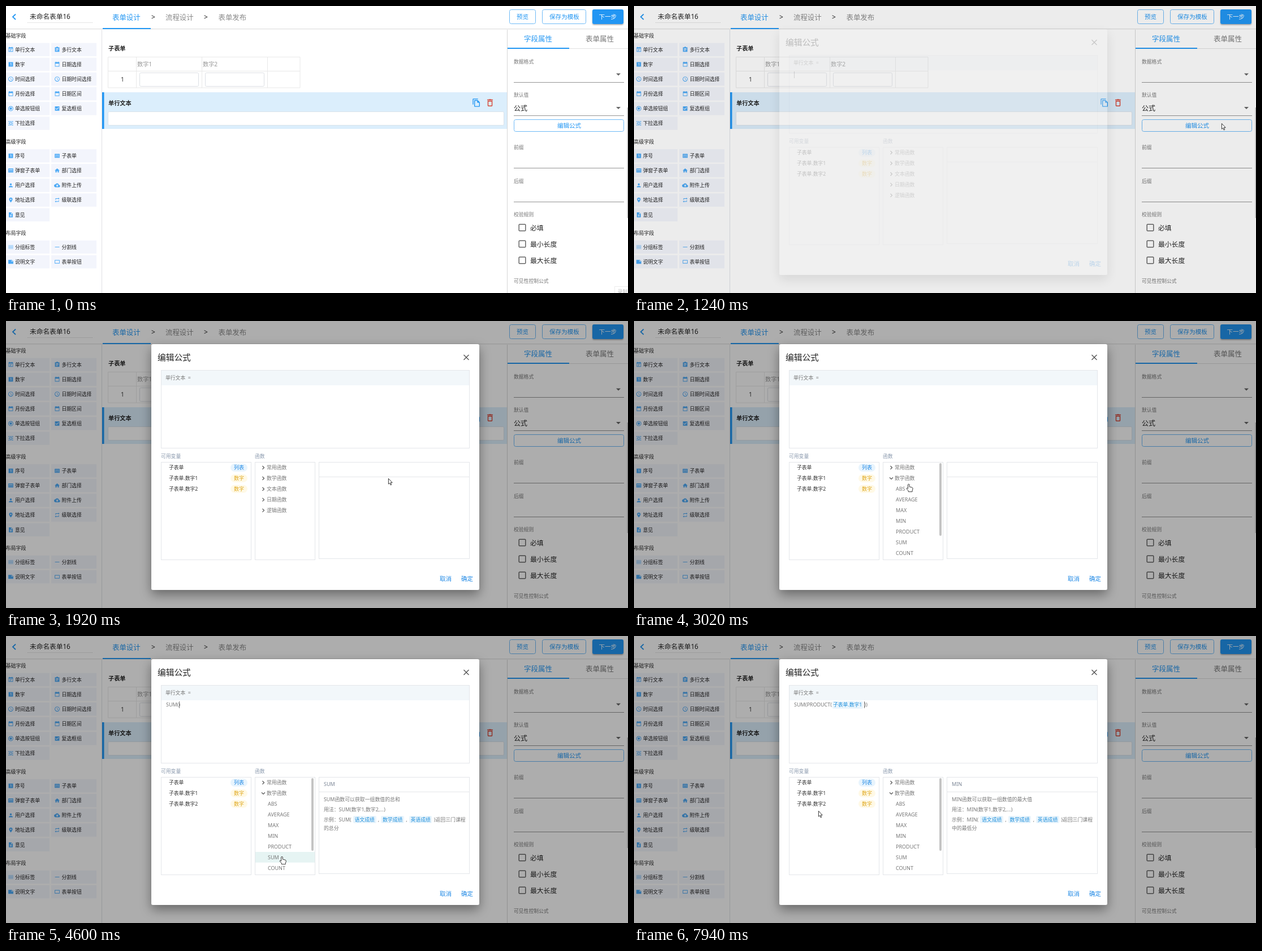
An HTML page for the animation above (8000 ms loop, 1100 by 509 pixels).

```html
<!DOCTYPE html>
<html lang="zh-CN">
<head>
<meta charset="utf-8">
<title>编辑公式</title>
<style>
html, body { margin: 0; width: 100%; height: 100%; overflow: hidden; background: #fff; }
svg { display: block; width: 100vw; height: 100vh; }
svg, .doc { font-family: "Noto Sans", "Noto Sans CJK SC", "Noto Sans CJK", sans-serif; }
text { white-space: pre; }
.doc { font-size: 8.9px; line-height: 15.7px; color: #777; white-space: nowrap; }
.doc p { margin: 0 0 2.3px; height: 15.7px; }
.doc b { display: inline-block; line-height: 13px; margin: 0 3.3px; padding: 0 2.5px; border-radius: 2px;
  background: #eaf5fc; color: #2090dc; font-weight: 500; }
</style>
</head>
<body>
<svg id="stage" viewBox="0 0 1100 509"></svg>
<script>
const LOOP = 8000, BLUE = '#2196f3', LINE = '#e4e6ea';

// y is the vertical middle of the glyphs
const text = (x, y, size, str, fill = '#333', more = '') =>
  `<text x="${x}" y="${y + size * .37}" font-size="${size}" fill="${fill}" ${more}>${str}</text>`;
const rect = (x, y, w, h, fill, more = '') =>
  `<rect x="${x}" y="${y}" width="${w}" height="${h}" fill="${fill}" ${more}/>`;
const box = (x, y, w, h, stroke = LINE, r = 0, fill = '#fff') =>
  rect(x + .5, y + .5, w - 1, h - 1, fill, `stroke="${stroke}" rx="${r}"`);
const path = (d, stroke, w = 1, fill = 'none') =>
  `<path d="${d}" stroke="${stroke}" stroke-width="${w}" fill="${fill}"/>`;
const bold = 'font-weight="700"';

// Sidebar icons on a 24 unit grid
const icons = {
  event: 'M3 3H6V1H8V3H16V1H18V3H21V21H3ZM5 8V19H19V8ZM8 11H16V13H8ZM8 15H13V17H8Z',
  date: 'M3 3H6V1H8V3H16V1H18V3H21V21H3ZM5 9V19H19V9Z',
  page: 'M3 3H9A3 3 0 0 1 15 3H21V21H3ZM7 7V9H17V7ZM7 11V13H17V11ZM7 15V17H14V15Z',
  one: 'M3 3H21V21H3ZM10 7V9H12V17H14V7Z',
  clock: 'M12 2A10 10 0 1 1 11.9 2ZM12 4A8 8 0 1 0 12.1 4ZM11 7H12.6V12L17 14.6 16.2 16 11 13Z',
  radio: 'M12 2A10 10 0 1 1 11.9 2ZM12 4A8 8 0 1 0 12.1 4ZM12 7A5 5 0 1 1 11.9 7Z',
  check: 'M3 3H21V21H3ZM10 17L19 8 17.6 6.6 10 14.2 6.4 10.6 5 12Z',
  select: 'M3 3H7V5H5V7H3ZM10 3H14V5H10ZM17 3H21V7H19V5H17ZM3 10H5V14H3ZM19 10H21V14H19ZM3 17H5V19H7V21H3ZM10 19H14V21H10ZM19 17H21V21H17V19H19ZM7 7H17V17H7ZM9 9V15H15V9Z',
  form: 'M2 4H22V20H2ZM4 8V10H20V8ZM4 14V16H8V14ZM10 14V16H14V14ZM16 14V16H20V14Z',
  home: 'M10 20V14H14V20H19V12H22L12 3 2 12H5V20Z',
  user: 'M12 4A4 4 0 1 1 11.9 4ZM4 20V18C4 15 9 14 12 14S20 15 20 18V20Z',
  cloud: 'M19 10A7.5 7.5 0 0 0 5 8 6 6 0 0 0 6 20H19A5 5 0 0 0 19 10ZM14 13V17H10V13H7L12 8 17 13Z',
  place: 'M12 2A7 7 0 0 0 5 9C5 14 12 22 12 22S19 14 19 9A7 7 0 0 0 12 2ZM12 6.5A2.5 2.5 0 1 1 11.9 6.5Z',
  loop: 'M7 7H17V10L21 6 17 2V5H5V11H7ZM17 17H7V14L3 18 7 22V19H19V13H17Z',
  file: 'M4 2H14L20 8V22H4ZM8 12V14H16V12ZM8 16V18H16V16ZM13 3.5V9H18.5Z',
  menu: 'M2 5H22V7H2ZM2 11H22V13H2ZM2 17H22V19H2Z',
  minus: 'M3 11H21V13H3Z',
  note: 'M2 4H16L22 10V20H2ZM15 5.5V11H20.5Z',
  button: 'M2 5H22V19H2ZM4 7V17H20V7Z',
  copy: 'M16 1H4A2 2 0 0 0 2 3V17H4V3H16ZM15 5H8A2 2 0 0 0 6 7V21A2 2 0 0 0 8 23H19A2 2 0 0 0 21 21V11ZM8 21V7H14V12H19V21Z',
  trash: 'M15.5 4L14.5 3H9.5L8.5 4H5V6H19V4ZM6 7H18V19A2 2 0 0 1 16 21H8A2 2 0 0 1 6 19ZM8 9V19H16V9Z',
};
const icon = (name, x, y, size, fill) =>
  `<path transform="translate(${x - size / 2} ${y - size / 2}) scale(${size / 24})" fill="${fill}" fill-rule="evenodd" d="${icons[name]}"/>`;

const groups = [
  [53, '基础字段', 77.3, 'event 单行文本 page 多行文本 one 数字 date 日期选择 clock 时间选择 clock 日期时间选择 date 月份选择 date 日期区间 radio 单选按钮组 check 复选框组 select 下拉选择'],
  [241, '高级字段', 265.7, 'one 序号 form 子表单 form 弹窗子表单 home 部门选择 user 用户选择 cloud 附件上传 place 地址选择 loop 级联选择 file 意见'],
  [403, '布局字段', 427.5, 'menu 分组标签 minus 分割线 note 说明文字 button 表单按钮'],
];

function sidebar() {
  let s = '';
  for (const [y, title, top, list] of groups) {
    s += text(-.5, y, 9, title, '#222');
    const words = list.split(' ');
    for (let i = 0; i < words.length / 2; i++) {
      const right = i % 2, cy = top + 26.15 * (i >> 1);
      s += rect(right ? 80 : 0, cy - 11.7, right ? 80 : 77, 23.4, '#f3f5fc')
        + icon(words[2 * i], right ? 90.5 : 8.5, cy, 10.5, '#4ba9f5')
        + text(right ? 98.5 : 16, cy, 8.8, words[2 * i + 1], '#222');
    }
  }
  return s + rect(169, 41, 1, 468, '#dfe1e5');
}

function header() {
  return rect(0, 0, 1100, 41, '#fff') + rect(0, 40, 1100, 1, '#e2e2e2') + rect(0, 41, 1100, 1, '#f4f4f4')
    + path('M17 14.5L12 19.3 17 24', BLUE, 1.8)
    + text(42, 19, 11.7, '未命名表单16', '#222')
    + `<path d="M38 29.5H154" stroke="#ccc" stroke-dasharray="1 1"/>`
    + text(188, 20, 12.4, '表单设计', BLUE) + text(257, 20, 12, '&gt;', '#222')
    + text(282, 20, 12.4, '流程设计', '#888') + text(350, 20, 12, '&gt;', '#222')
    + text(375.5, 20, 12.4, '表单发布', '#888')
    + rect(171, 39, 85, 2, BLUE)
    + box(890, 6, 47, 26, '#6ebaf7', 3) + text(903, 19, 10.5, '预览', BLUE)
    + box(948, 6, 78, 26, '#6ebaf7', 3) + text(961, 19, 10.6, '保存为模板', BLUE)
    + rect(1037, 6, 55, 26, BLUE, 'rx="3" filter="url(#soft)"') + text(1048.5, 19, 10.5, '下一步', '#fff');
}

function form() {
  let s = text(181, 75, 10.2, '子表单', '#222', bold)
    + path('M180.5 90.5H520V145H180.5ZM180.5 115.5H520M230.5 90V145M346.5 90V145M462.5 90V145', '#e8e8e8')
    + text(203, 130, 10.3, '1', '#333');
  [0, 1].forEach(i => s += text(232 + 116 * i, 103, 10.2, '数字' + (i + 1), '#999')
    + box(236 + 116 * i, 118, 105, 25, '#dcdfe4', 2));
  return s + rect(170, 153, 716, 65, '#dbeefc') + rect(170, 153, 3.5, 65, BLUE)
    + text(181, 172, 10.2, '单行文本', '#222', bold)
    + box(180, 187, 701, 25, '#d9e2ea', 2)
    + icon('copy', 832, 171.5, 16, BLUE) + icon('trash', 856, 171.5, 17, '#d64535');
}

function properties() {
  const label = (y, str) => text(898, y, 8.8, str, '#777');
  const rule = y => rect(898, y, 195, 1, '#949494');
  const caret = y => `<path d="M1079 ${y - 2}h8l-4 4z" fill="#666"/>`;
  let s = rect(886, 41, 1, 468, '#d6d6d6')
    + text(916, 58, 12.5, '字段属性', BLUE) + text(1025, 58, 12.5, '表单属性', '#777')
    + rect(887, 75, 213, 1, '#e0e0e0') + rect(887, 74, 109, 2, BLUE)
    + label(98.5, '数据格式') + caret(121.5) + rule(135)
    + label(157.5, '默认值') + text(898, 181.5, 12, '公式', '#222') + caret(181) + rule(194)
    + box(898, 201, 195, 22, '#6ebaf7', 3) + text(975, 212, 10.5, '编辑公式', BLUE)
    + label(251, '前缀') + rule(287) + label(311, '后缀') + rule(347) + label(370, '校验规则');
  ['必填', '最小长度', '最大长度'].forEach((str, i) => {
    const y = 393 + 29 * i;
    s += rect(907.2, y - 5.8, 11.6, 11.6, '#fff', 'stroke="#666" stroke-width="1.5" rx="1"')
      + text(927, y + .5, 11.8, str, '#222');
  });
  return s + label(488, '可见性控制公式') + rect(1098.5, 180, 1.5, 196, '#c4c4c4');
}

function dialog() {
  let s = rect(257, 41, 580, 436, '#fff', 'rx="3" filter="url(#deep)"')
    + text(268, 65, 14.7, '编辑公式', '#222')
    + path('M809.5 60L818.5 69M818.5 60L809.5 69', '#555', 1.4)
    + box(274, 87, 546, 139) + rect(275, 88, 544, 26, '#f2f7fa')
    + text(282, 101, 8.8, '单行文本  =', '#777')
    + text(274, 239.5, 8.8, '可用变量', '#8a99ad') + text(440, 239.5, 8.8, '函数', '#8a99ad')
    + box(274, 250, 160, 174) + box(440, 250, 107, 174) + box(553, 250, 267, 172)
    + rect(553, 276, 267, 1, LINE)
    + text(767, 457.5, 10.5, '取消', '#1e88e5') + text(805, 457.5, 10.5, '确定', '#1e88e5');
  ['子表单', '子表单.数字1', '子表单.数字2'].forEach((str, i) => {
    const y = 260 + 18.9 * i;
    s += text(288, y, 8.8, str, '#333')
      + rect(397, y - 7, 30, 14, i ? '#fff9e6' : '#e8f4fd', 'rx="7"')
      + text(403, y, 9, i ? '数字' : '列表', i ? '#dfa61a' : '#1e88e5');
  });
  return s;
}

const funcs = ['ABS', 'AVERAGE', 'MAX', 'MIN', 'PRODUCT', 'SUM', 'COUNT'];
const rowY = i => 298 + 18.87 * i;

function tree(open, hover) {
  let s = '';
  const branch = (y, str, down) => s += text(461, y, 8.9, str, '#777')
    + path(down ? `M452 ${y - 1.5}l3 3 3-3` : `M453.5 ${y - 3}l3 3-3 3`, '#555', 1.2);
  branch(260, '常用函数');
  branch(279, '数学函数', open);
  if (!open) ['文本函数', '日期函数', '逻辑函数'].forEach((str, i) => branch(298 + 18.9 * i, str));
  else {
    funcs.forEach((name, i) => {
      if (name === hover) s += rect(441, rowY(i) - 9.4, 105, 18.8, '#e6f4f3');
      s += text(463, rowY(i), 9, name, '#777');
    });
    s += rect(540, 252, 4, 129, '#c4c4c4', 'rx="2"');
  }
  return s;
}

const chips = list => list.split(' ').map(c => `<b>${c}</b>`).join(',');
const scores = chips('语文成绩 数学成绩 英语成绩');
const series = '(数字1,数字2,...)';
const docs = {
  ABS: ['一个数的绝对值', '(数字)', '(-8)可以返回8，也就是-8的绝对值'],
  AVERAGE: ['一组数值的算术平均值', series, `(${scores})返回三门<br>课程的平均分`],
  MAX: ['一组数值的最大值', series, `(${scores})返回三门课程<br>中的最高分`],
  MIN: ['一组数值的最大值', series, `(${scores})返回三门课程<br>中的最低分`],
  PRODUCT: ['一组数值的乘积', series, `(${chips('单价 数量')}),获取总价，也就是单价和数量<br>的乘积`],
  SUM: ['一组数值的总和', series, `(${scores})返回三门课程<br>的总分`],
};
function help(name) {
  if (!name) return '';
  const [goal, use, sample] = docs[name];
  return text(562, 263, 9, name, '#7a8494')
    + `<foreignObject x="562" y="281.7" width="256" height="138"><div class="doc">`
    + `<p>${name}函数可以获取${goal}</p><p>用法：${name}${use}</p><p>示例：${name}${sample}</p></div></foreignObject>`;
}

function formula(t) {
  const line = (x, str) => text(x, 122, 9, str, '#777');
  let s = '', x = 283;
  if (t >= 7460) {
    s = line(283, 'SUM(PRODUCT(') + rect(351, 115.5, 54, 13.5, '#eaf5fc', 'rx="2"')
      + text(352, 122, 8.8, '子表单.数字1', '#2090dc', 'font-weight="500"') + line(407.5, '))');
    x = 407;
  } else if (t >= 6150) { s = line(283, 'SUM(PRODUCT())'); x = 350; }
  else if (t >= 4470) { s = line(283, 'SUM()'); x = 306; }
  const blink = [[1240, 1710], [2240, 2770], [4470, 5010], [5550, 6080], [6150, 6690], [7220, LOOP + 99]];
  if (blink.some(([a, b]) => t >= a && t < b)) s += rect(x, 116, 1, 12, '#777');
  return s;
}

const bursts = [[400, 1170, 12], [1240, 1450, 4], [1640, 2420, 12], [2490, 3290, 12], [3360, 4130, 12],
  [4200, 4270, 2], [4470, 4600, 2], [5010, 5350, 5], [5550, 5750, 4], [6080, 6280, 3], [6550, 7320, 12], [7390, 7940, 8]];
function snap(t) {
  const burst = bursts.filter(b => b[0] <= t).pop();
  if (!burst) return t;
  const [a, b, n] = burst, d = (b - a) / (n - 1);
  const step = Math.floor((t - a + 9.9) / d);
  return Math.min(b, Math.floor((a + step * d + .01) / 10) * 10);
}

const route = [[400, 1095, 313], [700, 1070, 262], [1000, 1045, 214], [1170, 1039, 208], [1570, 1039, 208],
  [1780, 850, 258], [1920, 676, 279], [2420, 600, 284], [2770, 482, 281], [2910, 482, 281], [3080, 490, 298],
  [3290, 492, 304], [3360, 492, 312], [3640, 493, 336], [3850, 492, 352], [3990, 490, 374], [4130, 488, 389],
  [4270, 488, 391], [5010, 488, 391], [5350, 488, 397], [5550, 488, 396], [5750, 491, 366], [6480, 491, 366],
  [6690, 484, 357], [6830, 440, 350], [7320, 333, 281], [7530, 330, 279], [7940, 326, 310]];
function position(t) {
  const i = route.findIndex(p => p[0] > t);
  if (i < 0) return route[route.length - 1].slice(1);
  const [a, b] = [route[i - 1], route[i]], k = (t - a[0]) / (b[0] - a[0]);
  return [1, 2].map(j => a[j] + (b[j] - a[j]) * k);
}

function pointer(t) {
  if (t < 400) return '';
  const [x, y] = position(t);
  const inside = (l, top, r, bottom) => x >= l && x < r && y >= top && y < bottom;
  const hand = t < 1240 ? inside(898, 201, 1093, 223) : inside(440, 250, 546, 423) || inside(275, 250, 433, 307);
  const d = hand
    ? 'M-1.3 1Q0-.7 1.3 1V5L6 6.2Q7.6 6.8 7.3 8.8L6.3 11.8V13.8H-.6V12L-4 8.3Q-3.6 6.6-2 7.6L-1.3 8.2Z'
    : 'M.4.4V10.2L2.6 8.3 4.2 12 5.7 11.3 4.2 7.7H7.2Z';
  return `<g transform="translate(${x} ${y})" stroke-linejoin="round">${path(d, '#222', .9, '#fff')}</g>`;
}

const hovers = [[3080, 'ABS'], [3360, 'AVERAGE'], [3570, 'MAX'], [3780, 'MIN'], [3920, 'PRODUCT'],
  [4060, 'SUM'], [5690, 'PRODUCT'], [6620, 'MIN']];

const stage = document.getElementById('stage');
stage.innerHTML = `<defs>
  <filter id="soft" x="-20%" y="-20%" width="140%" height="160%"><feDropShadow dx="0" dy="1.5" stdDeviation="1.3" flood-opacity=".35"/></filter>
  <filter id="deep" x="-10%" y="-10%" width="120%" height="125%"><feDropShadow dx="0" dy="8" stdDeviation="10" flood-opacity=".4"/></filter>
  </defs>` + sidebar() + form() + properties() + header()
  + `<g id="tip"></g>` + rect(0, 0, 1100, 509, '#000', 'id="shade"')
  + `<g id="modal">${dialog()}<g id="live"></g></g><g id="cursor"></g>`;
const [tip, shade, modal, live, cursor] = ['tip', 'shade', 'modal', 'live', 'cursor'].map(id => document.getElementById(id));

function draw(now) {
  const time = now % LOOP, q = snap(time), t = q + 10;
  const p = Math.max(0, Math.min(1, (q - 1170) / 225)), fade = p * p * (3 - 2 * p);
  const last = hovers.filter(h => h[0] <= t).pop(), name = last && last[1];
  tip.innerHTML = time < 1240
    ? box(1076, 497, 30, 20, '#ececec') + (time < 70 ? text(1081.5, 506.5, 8.8, '录制', '#bbb') : '') : '';
  shade.setAttribute('opacity', .32 * fade);
  modal.setAttribute('opacity', fade);
  live.innerHTML = tree(t >= 2910, t < 6830 && name) + help(name) + formula(t);
  cursor.innerHTML = pointer(q);
  requestAnimationFrame(draw);
}
requestAnimationFrame(draw);
</script>
</body>
</html>
```
